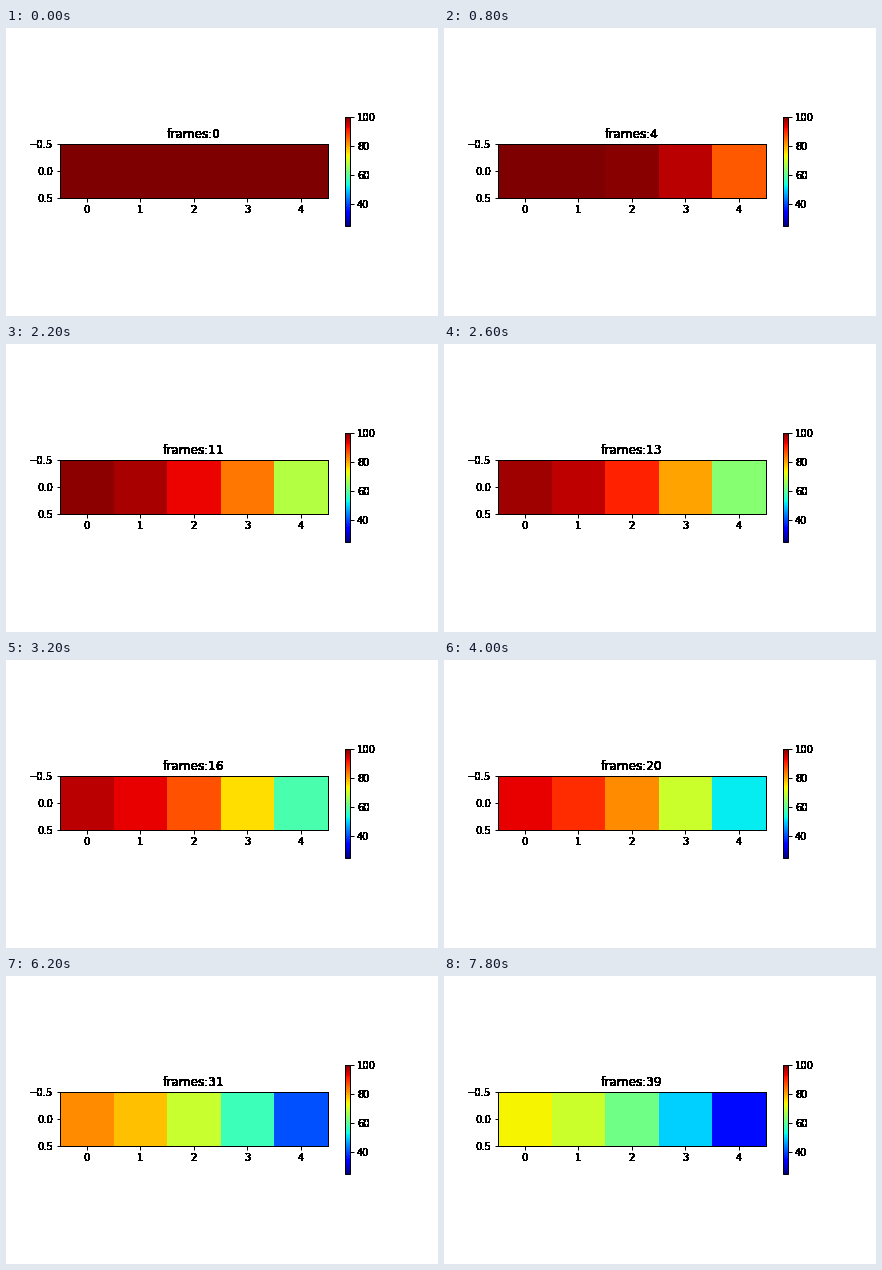
These frames come from a looping animation (432x288 px, 8000 ms). A matplotlib script:

```python
import numpy as np
import matplotlib.pyplot as plt
from matplotlib.animation import FuncAnimation

FRAMES = 40
CELLS = 5
START, ROOM = 100.0, 25.0
DIFFUSION = 0.25
COOLING = 0.05


def step(rod):
    """Advance the rod: insulated left end, right end cooling to room level."""
    new = rod.copy()
    new[0] += DIFFUSION * (rod[1] - rod[0])
    new[1:-1] += DIFFUSION * (rod[:-2] - 2 * rod[1:-1] + rod[2:])
    new[-1] -= COOLING * (rod[-1] - ROOM)
    return new


def simulate():
    rods = [np.full(CELLS, START)]
    while len(rods) < FRAMES:
        rods.append(step(rods[-1]))
    return rods


def solid(image, dpi):
    """Turn antialiased glyphs into solid black pixels."""
    out = np.zeros_like(image)
    out[..., 3] = image[..., 3] > 0.03
    return out, 0, 0


plt.rcParams.update({
    "font.family": "DejaVu Sans",
    "font.size": 10,
    "axes.linewidth": 1,
    "xtick.major.width": 1,
    "ytick.major.width": 1,
})

history = simulate()

fig, ax = plt.subplots(figsize=(6, 4), dpi=72, facecolor="white")
fig.subplots_adjust(left=0.125, right=0.9, bottom=0.125, top=0.88)

image = ax.imshow(history[0][None, :], cmap="jet", vmin=ROOM, vmax=START,
                  interpolation="nearest")
ax.set_xticks(range(CELLS))
ax.set_yticks([-0.5, 0, 0.5])
bar = fig.colorbar(image, ax=ax, shrink=0.5, ticks=[40, 60, 80, 100])
title = ax.set_title("frames:0", fontsize=12, pad=6)

labels = ax.get_xticklabels() + ax.get_yticklabels() + bar.ax.get_yticklabels()
for text in [title, *labels]:
    text.set_agg_filter(solid)


def update(frame):
    image.set_data(history[frame][None, :])
    title.set_text(f"frames:{frame}")
    return image, title


anim = FuncAnimation(fig, update, frames=FRAMES, interval=200,
                     repeat=True, repeat_delay=0, blit=False)
plt.show()
```
